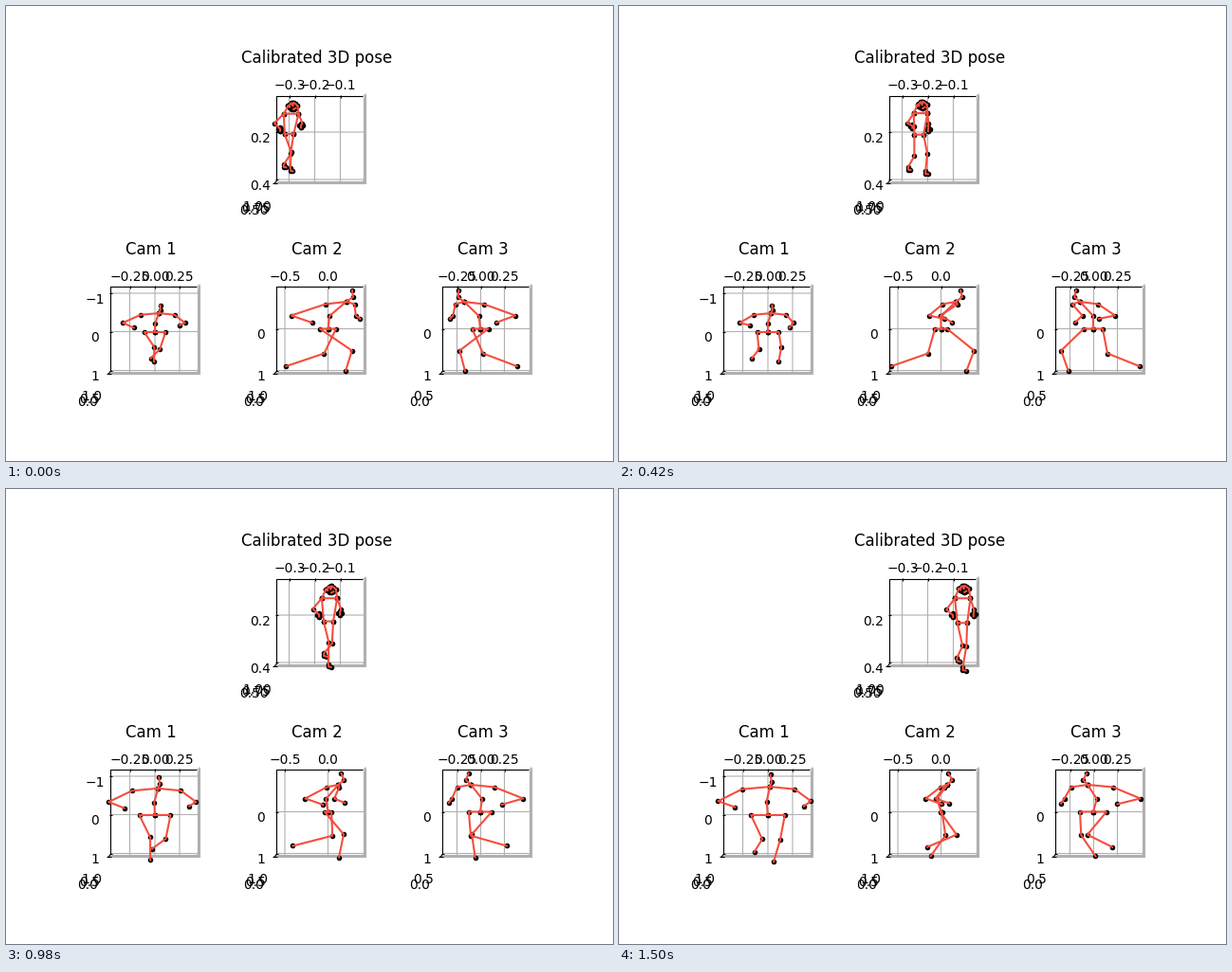
Write a matplotlib script that moves like this. It is 640 by 480 pixels and loops after 1.52 s.

```python
import numpy as np
import matplotlib.pyplot as plt
from matplotlib.animation import FuncAnimation

W, H, DPI = 640, 480, 100
STEP, FRAMES = 20, 76
STRIDE, SPAN = 840, 1500  # ms per gait cycle, ms over which the view drifts
RED, GRID = "#f54d3d", "#b0b0b0"

fig = plt.figure(figsize=(W / DPI, H / DPI), dpi=DPI, facecolor="white")
ax = fig.add_axes([0, 0, 1, 1])
ax.set_xlim(0, W)
ax.set_ylim(H, 0)
ax.axis("off")

# ---- one walking body, measured from the hip ----
# Middle joints: height, forward
MIDDLE = dict(
    spine=(-13.5, 1.5),
    chest=(-28.5, 18),
    nose=(-33.5, 25),
    head=(-40.5, 24),
    face=(-36, 22),
)
# Paired joints: height, forward, sideways, then cos and sin of swing and drop
PAIRED = dict(
    hip=(0, 0, 1, 0, 0, 0, 0),
    knee=(24.5, 10, 0.65, 19, -2, -1.5, 0),
    foot=(42, -12, 0.55, 34, 9, 2.5, 5.5),
    heel=(45, -11, 0.5, 34, 9, 2.5, 5.5),
    toe=(45.5, 2, 0.55, 34, 9, 2.5, 5.5),
    sho=(-26, 12, 1.55, -2, 0, 0, 0),
    elb=(-14, -4.5, 2.7, -10.5, 0, 0, 0),
    wri=(-8.5, 8, 2, -8, 0, 2, 0),
    ear=(-36, 22, 1.05, 0, 0, 0, 0),
)
LEAN = 0.41  # forward lean lost per unit of height


def blend(ends, u):
    return ends[0] + (ends[1] - ends[0]) * u


def ease(u):
    u = np.clip(u, 0, 1)
    return u * u * (3 - 2 * u)


def steady(t):
    return t / SPAN


def approach(t):
    return ease((t - 650) / 450)


class View:
    """A camera: where the hip sits and how the body axes appear on screen."""

    def __init__(self, x, y, side, forward, size=(1, 1), growth=steady, bob=0):
        self.x, self.y, self.side = x, y, side
        self.forward, self.size = forward, size
        self.growth, self.bob = growth, bob

    def pose(self, t):
        u = t / SPAN
        size = blend(self.size, self.growth(t))
        side = blend(self.side, u)
        turn = 2 * np.pi * t / STRIDE
        hip = np.array([blend(self.x, u), blend(self.y, u) - self.bob * np.cos(2 * turn)])

        def place(height, ahead, across=0):
            ahead += LEAN * min(height, 0) * u
            return hip + size * np.array([self.forward * ahead + across * side, height])

        joints = {"hip": hip}
        for name, spot in MIDDLE.items():
            joints[name] = place(*spot)
        for name, (height, ahead, across, *wave) in PAIRED.items():
            for prefix, sign in (("r_", 1), ("l_", -1)):
                # the left side runs half a stride later
                c, s = sign * np.cos(turn), sign * np.sin(turn)
                swing, drop = wave[0] * c + wave[1] * s, wave[2] * c + wave[3] * s
                spot = place(height, 0, sign * across)
                spot += size * np.array([self.forward * (ahead + swing), drop])
                joints[prefix + name] = spot
        return joints


CAM_BONES = [
    "hip r_hip r_knee r_foot",
    "hip l_hip l_knee l_foot",
    "hip spine chest nose head",
    "chest l_sho l_elb l_wri",
    "chest r_sho r_elb r_wri",
]
FULL_BONES = [
    "r_ear face4 face5 face6 face face7 face8 l_ear",
    "face1 face2",
    "r_ear r_sho l_sho l_ear",
    "r_sho r_elb r_wri r_wri1",
    "l_sho l_elb l_wri l_wri1",
    "r_sho r_hip l_hip l_sho",
    "r_hip r_knee r_foot r_heel r_toe",
    "l_hip l_knee l_foot l_heel l_toe",
]
VIEWS = [
    (View((298.5, 362), (137, 139.5), (-5.8, -5.2), 0.22, (0.82, 1), bob=2), FULL_BONES),
    (View((157, 157), (344, 344), (-16, -17), 0.33, (0.7, 1.05), approach), CAM_BONES),
    (View((339.5, 339.5), (340.5, 340.5), (-8.5, -1), 1.06), CAM_BONES),
    (View((500, 500), (340.5, 340.5), (8.5, 14), -0.94), CAM_BONES),
]


def add_ring(joints, name, count, radius):
    """Small cluster of points around a joint."""
    for k in range(count):
        a = 2 * np.pi * k / count
        joints[f"{name}{k}"] = joints[name] + radius * np.array([np.cos(a), np.sin(a)])


# ---- static panels ----
def line(points, color, width=0.8, z=1):
    ax.plot(*zip(*points), color=color, lw=width, zorder=z, solid_capstyle="butt")


def label(x, y, s, size=10):
    ax.text(x, y, s, fontsize=size, family="DejaVu Sans", ha="center", va="baseline", zorder=4)


def panel(left, top, title, xticks, yticks, depth):
    """Open box in slight perspective; ticks pair a position with a label."""
    right, bottom = left + 91, top + 89
    cx, cy = left + 45.5, top + 44.5

    def near(x, y, s=1.065):
        return cx + (x - cx) * s, cy + (y - cy) * s

    label(left + 42.5, top - 35, title, 12)
    for s in (1, 1.033, 1.065):
        line([near(left, bottom, s), near(right, bottom, s), near(right, top, s)], GRID)
    for corner in ((right, top), (right, bottom)):
        line([corner, near(*corner)], GRID)
    for x, s in xticks:
        line([(x, top), (x, bottom), near(x, bottom)], GRID)
        line([(x, top - 1.5), (x, top + 1.5)], "black")
        label(near(x, top, 0.98)[0], top - 7, s)
    for y, s in yticks:
        line([(left, y), (right, y), near(right, y)], GRID)
        line([(left - 2, y), (left + 1, y)], "black")
        label(left - 17, y + 10.5, s)
    line([(right, top), (left, top), (left, bottom), near(left, bottom)], "black", z=1.5)
    x, y = near(left, bottom)
    line([(x - 2, y), (x + 3, y)], "black")
    for k, s in depth:
        label(left - 24.5 + 2 * k, bottom + 36 - 2.5 * k, s)


CAM_DEPTH = [(0, "0.0"), (1, "0.5"), (2, "1.0")]
panel(285.5, 95.5, "Calibrated 3D pose",
      [(298.5, "−0.3"), (325.5, "−0.2"), (352.5, "−0.1")],
      [(133, "0.2"), (183, "0.4")],
      [(0, "0.50"), (1, "0.75"), (2, "1.00")])
panel(110.5, 296.5, "Cam 1",
      [(130.5, "−0.25"), (157, "0.00"), (183, "0.25")],
      [(303, "−1"), (343.5, "0"), (384.5, "1")], CAM_DEPTH)
panel(285.5, 296.5, "Cam 2",
      [(294, "−0.5"), (339.5, "0.0")],
      [(340.5, "0"), (384.5, "1")], CAM_DEPTH)
panel(460.5, 296.5, "Cam 3",
      [(475.5, "−0.25"), (500.5, "0.00"), (525.5, "0.25")],
      [(340.5, "0"), (384.5, "1")],
      [(0, "0.0"), (2, "0.5")])

# ---- animation ----
dots, = ax.plot([], [], "o", color="black", ms=4, mew=0, zorder=2)
bones, = ax.plot([], [], color=RED, lw=1.5, zorder=3)
GAP = (np.nan, np.nan)


def draw(i):
    points, path = [], []
    for view, chains in VIEWS:
        joints = view.pose(i * STEP)
        if chains is FULL_BONES:
            add_ring(joints, "face", 9, 3.6)
            add_ring(joints, "r_wri", 4, 2)
            add_ring(joints, "l_wri", 4, 2)
        names = [name for chain in chains for name in chain.split()]
        if chains is FULL_BONES:
            names += [name for name in joints if name[-1].isdigit()]
        points += [joints[name] for name in names]
        for chain in chains:
            path += [joints[name] for name in chain.split()] + [GAP]
    dots.set_data(*np.transpose(points))
    bones.set_data(*np.transpose(path))
    return dots, bones


anim = FuncAnimation(fig, draw, frames=FRAMES, interval=STEP, repeat=True, repeat_delay=0)
plt.show()
```
